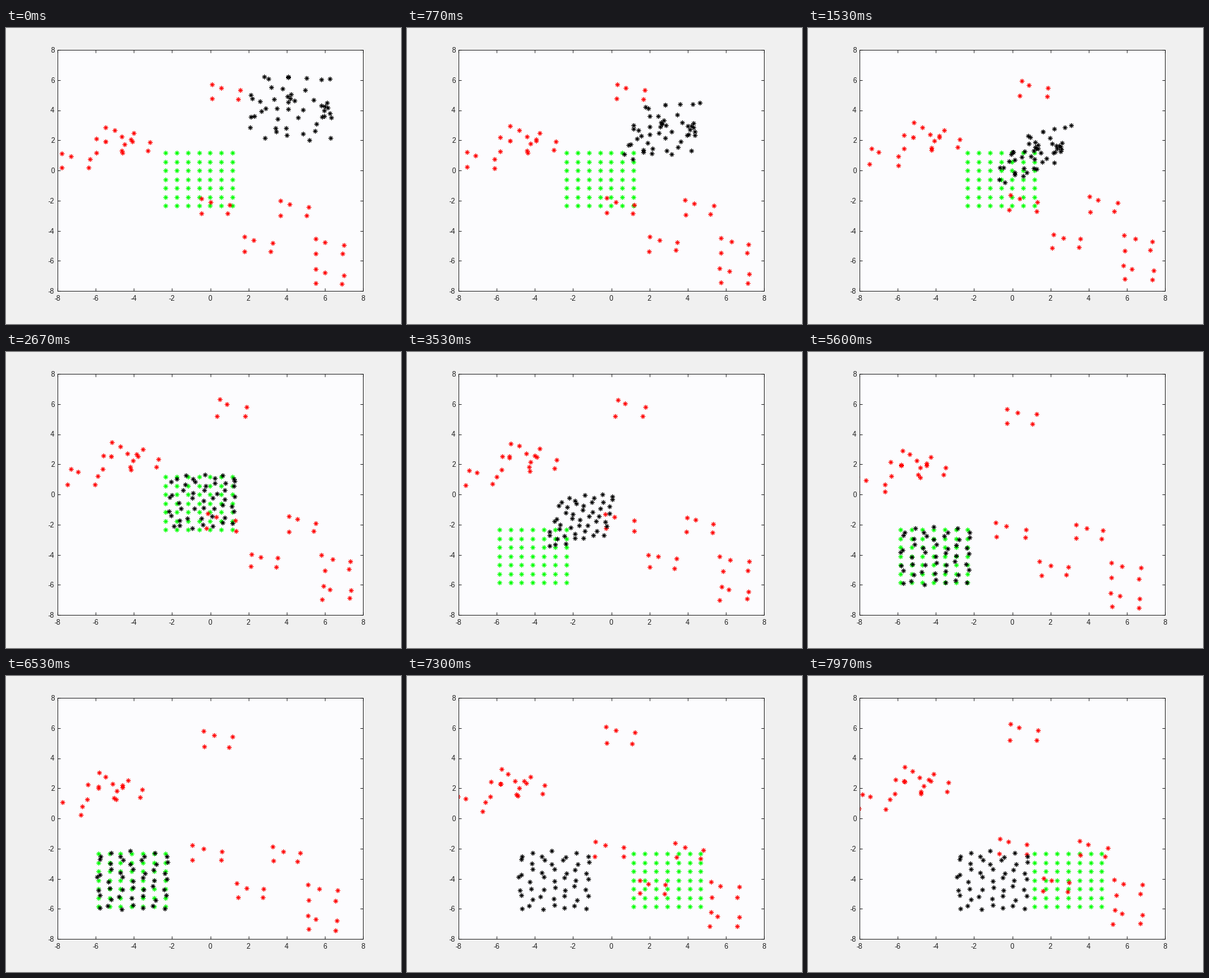
Animation, 560 px wide and 420 px high, one loop 8 s. Source, as a matplotlib script:

```python
import numpy as np
import matplotlib.pyplot as plt
from matplotlib.animation import FuncAnimation

FRAMES, FPS = 240, 30
N = 7                        # the grid and the swarm are N x N
HOP_AT, HOP_EVERY = 88, 120  # frames at which the grid moves on
HALF, SPEED = 1.76, 2.94
HOME, STEP = np.array([-0.59, -0.59]), 2 * HALF
CENTRES = HOME + STEP * np.array([(0, 0), (-1, -1), (1, -1)])

plt.rcParams.update({
    "font.family": "Liberation Sans",
    "font.size": 7.2,
    "axes.unicode_minus": False,
})

rng = np.random.default_rng(4)

side = np.linspace(-HALF, HALF, N)
grid = np.stack(np.meshgrid(side, side), axis=-1).reshape(-1, 2)

# The swarm starts scattered and rests on a staggered, slightly uneven lattice
start = rng.uniform(1.8, 6.4, (N * N, 2))
stagger = np.where(np.arange(N * N) % 2, 0.12, -0.12)[:, None] * (0, 1)
rest = grid + stagger + rng.uniform(-0.11, 0.11, grid.shape)

# Obstacles: one five-point shape repeated at ten anchors
shape = np.array([(0, 0), (0, -0.95), (0.48, -0.22), (1.48, -0.40), (1.38, -0.97)])
anchors = np.array([
    (-7.77, 1.14), (-5.97, 2.12), (-5.48, 2.87), (-4.64, 2.26), (0.08, 5.71),
    (-0.47, -1.89), (3.66, -2.03), (1.78, -4.41), (5.54, -4.55), (5.51, -6.55)])
obstacles = (anchors[:, None] + shape).reshape(-1, 2)
rate = rng.uniform(0.6, 1.5, obstacles.shape)
phase = rng.uniform(0, 2 * np.pi, obstacles.shape)


def leg(frame):
    return max(0, (frame - HOP_AT) // HOP_EVERY + 1)


def by_diagonal(points):
    """Order points in rows across the line of travel."""
    rows = np.argsort(points.sum(axis=1)).reshape(N, N)
    order = [r[np.argsort(points[r, 0] - points[r, 1])] for r in rows]
    return points[np.concatenate(order)]


def fly():
    """Head for the grid at a steady speed, then settle on the own spot."""
    pos, spots = by_diagonal(start), by_diagonal(rest)
    path = [pos]
    for frame in range(FRAMES - 1):
        n = leg(frame)
        to_centre = CENTRES[n] - pos
        inside = (np.abs(to_centre).max(axis=1) < HALF + 0.24)[:, None]
        # the last hop is sideways only, so the swarm keeps its shape
        drive = to_centre * (1, n < 2)
        aim = np.where(inside, to_centre + spots, drive)
        dist = np.hypot(*aim.T)[:, None] + 1e-9
        speed = np.where(inside, np.minimum(SPEED, 2 * dist), SPEED)
        pos = pos + aim / dist * speed / FPS
        path.append(pos)
    return np.array(path)


def drift(t):
    sway = np.array([0.4 * np.sin(0.73 * t),
                     0.28 * (np.cos(1.15 * (t - 3)) - np.cos(3.45))])
    wander = 0.05 * (np.sin(rate * t + phase) - np.sin(phase))
    return obstacles + sway + wander


path = fly()

fig = plt.figure(figsize=(5.6, 4.2), dpi=100, facecolor="#f0f0f0")
ax = fig.add_axes([73 / 560, 47 / 420, 433 / 560, 342 / 420], facecolor="#fcfcfe")
ticks = range(-8, 9, 2)
ax.set(xlim=(-8, 8), ylim=(-8, 8), xticks=ticks, yticks=ticks)
ax.tick_params(direction="in", top=True, right=True, length=3.2, width=0.6,
               color="#202020", labelcolor="#202020")
ax.tick_params(axis="x", pad=4.6)
ax.tick_params(axis="y", pad=3)
for spine in ax.spines.values():
    spine.set(linewidth=0.6, color="#202020")


def stars(color):
    return ax.plot([], [], ls="", marker=(8, 2, 0), ms=5, mew=0.5, color=color)[0]


goal, block, swarm = stars("#00ff00"), stars("#ff0000"), stars("#000000")


def draw(frame):
    goal.set_data(*(grid + CENTRES[leg(frame)]).T)
    block.set_data(*drift(frame / FPS).T)
    swarm.set_data(*path[frame].T)
    return goal, block, swarm


anim = FuncAnimation(fig, draw, frames=FRAMES, interval=8000 / FRAMES,
                     repeat=True, repeat_delay=0)
plt.show()
```
